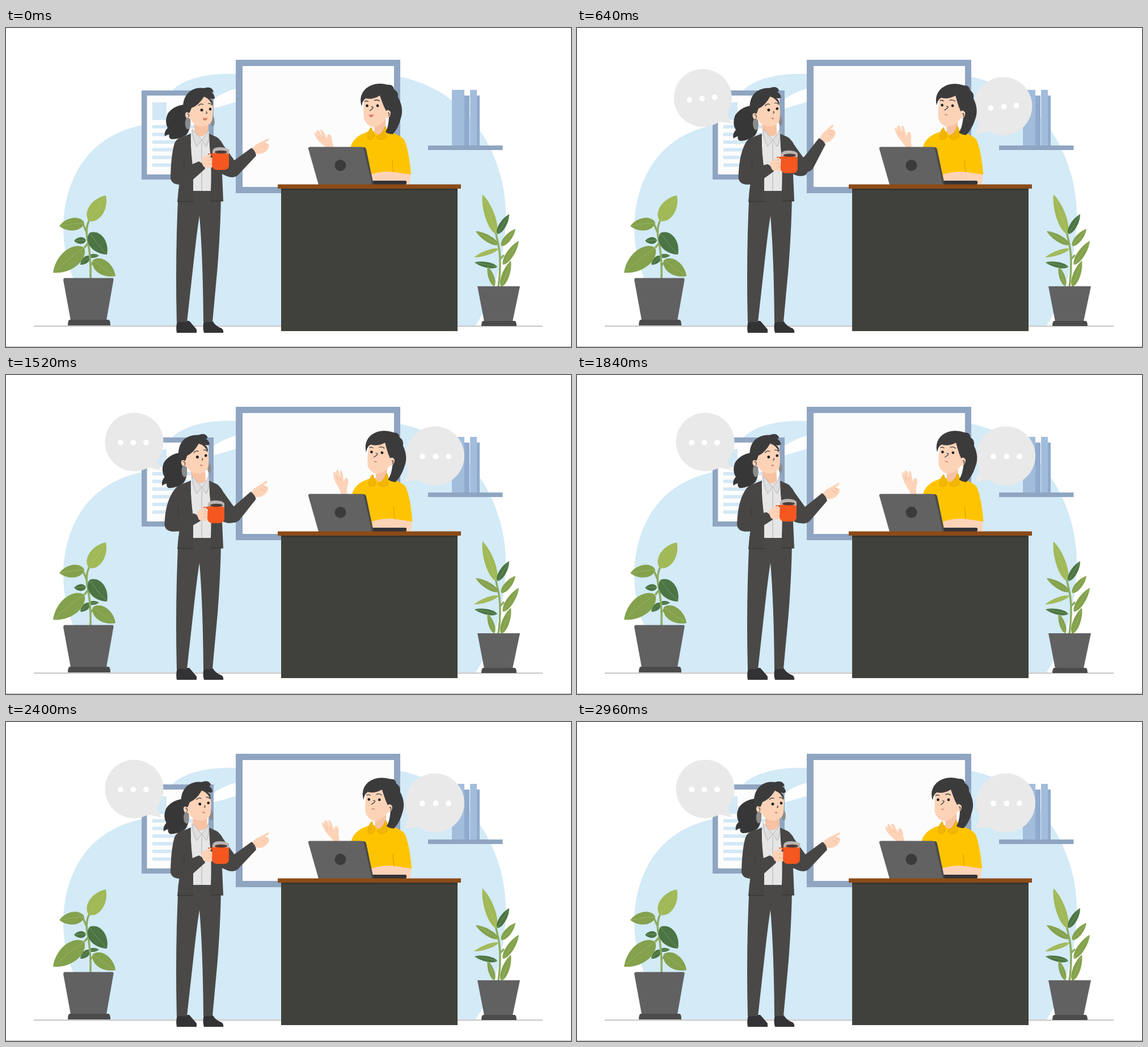
An HTML page for the animation above (3.04 s loop, 996 px wide and 562 px high).

```html
<!DOCTYPE html>
<html lang="en">
<head>
<meta charset="utf-8">
<title>Front desk chat</title>
<style>
html, body { margin: 0; width: 100%; height: 100%; overflow: hidden; background: #fff; }
svg { display: block; width: 100vw; height: 100vh; }
</style>
</head>
<body>
<svg id="stage" viewBox="0 0 996 562" preserveAspectRatio="none">
  <g id="room">
    <path fill="#d3eaf7" d="M101 350C102 285 130 194 240 171C305 158 355 146 405 130L500 80L690 85C735 94 770 111 800 140C852 186 881 260 881 330C881 400 860 475 828 524H172C150 500 130 470 118 440Q101 400 101 350Z"/>
    <path fill="#fff" d="M240 171Q320 153 405 130V70H240Z"/>
    <path fill="#d3eaf7" d="M291 112C312 88 360 79 405 81V107Q385 112 366 125L330 112Z"/>
    <path fill="#b3b3b3" d="M49 524.500H946V526H49Z"/>
    <path fill="#b5b5b5" d="M0 561H996V562H0Z"/>
    <path fill="#8fa5c1" d="M239 110H366V267H239Z"/>
    <path fill="#fdfdfd" d="M248.500 119H357V258H248.500Z"/>
    <path fill="#d3e8f6" d="M258 131H283V162H258Z"/>
    <path stroke="#d3e8f6" stroke-width="6" d="M258 174H347M258 187.500H347M258 201H347M258 214.500H347M258 228H347M258 241.500H347"/>
    <path fill="#8fa5c1" d="M405 56H695V291H405Z"/>
    <path fill="#fcfcfc" d="M417 67H684V280H417Z"/>
    <path fill="#a2bddc" d="M786 109H808V207H786ZM818 109H830V207H818Z"/>
    <path fill="#90aace" d="M808 119H817V207H808ZM830 119H835V207H830Z"/>
    <path fill="#8fa5c1" d="M744 207H875.500V215H744Z"/>
  </g>
  <g id="plants"></g>
  <g id="bubbleLeft" fill="#e9e9e9">
    <path d="M247 162L273 168L264 147Z"/><circle cx="226" cy="118" r="51.500"/>
    <g fill="#fff"><circle cx="202" cy="119" r="5"/><circle cx="224.500" cy="119" r="5"/><circle cx="247" cy="119" r="5"/></g>
  </g>
  <g id="bubbleRight" fill="#e9e9e9">
    <path d="M708 165Q709 178 701 187Q717 188 731 183Z"/><circle cx="756" cy="142.500" r="52"/>
    <g fill="#fff"><circle cx="734" cy="143.500" r="5"/><circle cx="757.500" cy="143.500" r="5"/><circle cx="780" cy="143.500" r="5"/></g>
  </g>

  <g id="clerk">
    <g id="wave" fill="#fdd3b8">
      <path d="M568 214Q560 207 553 201Q545 193 543.500 186Q544 182 547 186L551 191Q545 184 548 180Q551 178 555 187L558 190Q553 181 554 179Q558 178 562 187L566 195Q566 186 570 187Q575 190 575 201L579 214L600 245L585 250Z"/>
      <path d="M551 191L555 196M558 190L560 195" stroke="#efb89c" fill="none"/>
    </g>
    <g id="clerkBody">
      <path fill="#ffc400" d="M641 182Q625 186 617 194Q607 203 607 216L630 270H684L714 258Q710 214 702 197Q695 188 671 181Z"/>
      <path d="M684 257Q681 246 681 232" stroke="#dca500" stroke-width="1.300" fill="none"/>
      <path fill="#fdd3b8" d="M643 258Q665 251 685 254L713 258Q713 270 711 276H645Z"/>
      <path fill="#f7c2a2" d="M648 160H669V180Q660 193 650 185Z"/>
      <path fill="#f3b600" stroke="#dca500" stroke-width=".8" d="M644 175Q637 181 637 195Q646 200 650 190Q646 183 644 175ZM668 173Q673 178 671 193Q660 201 653 192Q665 185 668 173Z"/>
    </g>
    <g id="clerkHead">
      <path fill="#3c3b3c" d="M670 101Q682 97 684 108Q692 112 691 122Q702 141 696 159Q692 176 682 187Q673 187 669 183Q676 172 675 145Z"/>
      <path fill="#fdd3b8" d="M632 122Q629 145 631 160Q635 172 648 175Q664 171 670 159Q679 158 678 147L672 118L650 105Z"/>
      <path fill="#3c3b3c" d="M627 138Q621 120 634 107Q650 94 673 100Q688 106 686 130Q685 146 678 148Q674 142 670 146L666 138Q662 128 659 119Q646 127 634 124Q628 128 627 138Z"/>
      <path d="M673 150Q677 148 675 155M632 130Q635 127 639 130M649 128Q654 125 659 129M644 139Q649 138 646 142L641 146" fill="none" stroke="#3c3b3c" stroke-width="1.300"/>
      <circle cx="636.500" cy="137" r="2.400" fill="#222"/><circle cx="655" cy="137" r="2.400" fill="#222"/>
      <path class="mouth" fill="#d97965" d="M639 152Q644 154 649 152Q646 158 642 157Z"/>
      <path class="lips" fill="#d98a76" d="M641 153Q645 151.500 648 154Q645 156 641 153Z"/>
    </g>
  </g>

  <g id="desk">
    <path fill="#333337" d="M641 269H704Q708 270 705 276H641Z"/>
    <path fill="#4a4a4b" d="M625 210H630Q634 210 635 214L648 276H635Z"/>
    <path fill="#626263" d="M536 209.500H626Q630 210 631 214L645 276H551L533 213Q532 210 536 209.500Z"/>
    <circle cx="589.500" cy="242" r="10" fill="#3b3b3c"/>
    <path fill="#41413c" d="M485 282H796V534H485Z"/>
    <path fill="#363631" d="M485 283H796V286H485Z"/>
    <path fill="#8b4b17" d="M479 275.500H802V283H479Z"/>
  </g>

  <g id="visitor">
    <g id="visitorHead">
      <path fill="#383738" d="M314 135Q295 137 285 151Q279 165 285 176Q278 183 280 191Q285 187 288 188Q286 194 292 196Q306 196 317 189Q326 180 325 160L328 140Z"/>
      <ellipse cx="364.500" cy="165" rx="3.300" ry="9" fill="#8c8c8c"/>
      <path fill="#f7c2a2" d="M332 155H357V200H332Z"/>
      <path fill="#fdd3b8" d="M326 124L323 149Q315 146 316 154Q318 163 326 161Q331 173 347 174Q364 171 364 157Q367 138 361 122L345 113Z"/>
      <path fill="#3c3b3c" d="M312 147Q310 122 325 111Q336 104 349 106Q361 102 365 110Q365 115 361 113Q368 117 368 124Q364 126 359 124Q366 128 364 137Q360 125 349 121Q339 137 327 141Q325 147 323 150Q316 145 316 153Q313 152 312 147Z"/>
      <ellipse cx="320.500" cy="168" rx="4.800" ry="10.500" fill="#8c8c8c"/>
      <path d="M319 151Q324 151 322 157M339 137Q343 132 348 135M356 133Q361 132 363 136M353 147Q356 150 352 151" fill="none" stroke="#3c3b3c" stroke-width="1.200"/>
      <circle cx="345" cy="144.500" r="2.500" fill="#222"/><circle cx="360" cy="143" r="2.400" fill="#222"/>
      <path class="mouth" fill="#d97965" d="M347 158Q351 160 355 157.500Q354 164 350 163Q347 162 347 158Z"/>
      <path class="lips" fill="#d98a76" d="M348 159Q352 157 354 160Q351 163 348 159Z"/>
    </g>
    <path fill="#333335" d="M302 516H323Q331 525 336 531V537H301Q299 527 302 516ZM349 516H364Q370 526 380 529Q384 532 383 537H349Q346 528 349 516Z"/>
    <path fill="#4a4947" d="M304 284H379Q379 340 373 420L364 518H348Q347 400 341 331Q337 355 331 410L319 518H301Q298 400 304 284Z"/>
    <path fill="#e6e6e7" d="M326 180L334 184Q344 200 357 180L362 200V287H329Z"/>
    <path fill="none" stroke="#b8b8ba" stroke-width="1.200" d="M345 202V287"/>
    <path fill="#dededf" stroke="#b4b4b6" d="M328 178L333 183L345 198L336 209Q329 196 328 178ZM357 178L354 186L345 198L353 209Q360 197 357 178Z"/>
    <path fill="#474645" d="M326 186L303 195Q294 203 299 230L307 260L302 306H329L330 287V250Q325 215 326 186ZM358 186L374 194Q381 202 380 235L383 305H361V287Q363 240 359 210Z"/>
    <path fill="#383838" d="M302 305H331V306.500H302ZM361 304H383V305.500H361Z"/>
    <path fill="#474645" d="M364 189Q377 193 383 206L406 238Q411 250 403 259Q388 265 374 252Z"/>
    <g id="pointArm">
      <path fill="#fdd3b8" d="M432 215Q437 207 443 204L462 194.500Q465 195 463 198L456 202Q464 203 464 208Q463 214 456 219Q447 224 441 221L437 226Z"/>
      <path d="M455 203Q459 205 460 208M450 208Q456 209 458 213" stroke="#eeb799" fill="none"/>
      <path fill="#474645" d="M385 249Q389 238 400 235L433 211Q440 217 441 225L409 259Q401 266 389 261Q381 257 385 249Z"/>
    </g>
    <path id="upperArm" fill="none" stroke="#474645" stroke-width="25" stroke-linecap="round"/>
    <path id="foreArm" fill="#474645"/>
    <path id="armFold" fill="none" stroke="#373737"/>
    <g id="mug">
      <path d="M367 223H358Q356 238 367 239" fill="none" stroke="#dd4515" stroke-width="3.500"/>
      <path fill="#fdd3b8" d="M344 234Q346 227 354 224L360 222Q364 224 358 227L364 229V245Q357 248 348 244Z"/>
      <path d="M355 233H364M355 239H364" stroke="#efb89c"/>
      <path fill="#f4571f" d="M364 216L393 214V243Q392 250 384 250H371Q364 249 363 242Z"/>
      <path fill="#bab5b3" d="M364 218Q364 210 377 210Q391 210 393 216V222Q379 218 364 221Z"/>
      <ellipse cx="379" cy="218.500" rx="11" ry="2.800" fill="#4b3d3a"/>
    </g>
  </g>
</svg>
<script>
const $ = id => document.getElementById(id);
const LOOP = 3040, STEP = 80;
const LIGHT = '#a1b957', MID = '#84a24d', DARK = '#4b7544';

function leaf(x1, y1, x2, y2, width, color) {
  const dx = x2 - x1, dy = y2 - y1, len = Math.hypot(dx, dy);
  const nx = -dy / len * width, ny = dx / len * width;
  const at = (k, side) => `${x1 + dx * k + nx * side} ${y1 + dy * k + ny * side}`;
  return `<path fill="${color}" d="M${x1} ${y1}C${at(.12, .67)} ${at(.68, .67)} ${x2} ${y2}C${at(.68, -.67)} ${at(.12, -.67)} ${x1} ${y1}Z"/>
    <path fill="none" stroke="#c3cf8e" stroke-width=".7" opacity=".5" d="M${x1} ${y1}Q${at(.5, .08)} ${at(.93, 0)}"/>`;
}
const stem = d => `<path d="${d}" fill="none" stroke="#8dac63" stroke-width="3.500"/>`;
const pot = (body, base) => `<path fill="#616162" d="${body}"/><path fill="#4b4b4c" d="${base}"/>`;

$('plants').innerHTML = [
  leaf(141, 374, 120, 375, 12, DARK), leaf(148, 402, 131, 417, 11, DARK), leaf(146, 402, 164, 401, 7, DARK),
  stem('M149 441Q150 405 144 374Q139 352 148 336M144 380L138 387M149 418L157 410M142 360L136 346'),
  leaf(146, 340, 176, 295, 27, LIGHT), leaf(138, 343, 94, 349, 22, MID),
  leaf(147, 361, 178, 399, 28, DARK), leaf(138, 387, 83, 431, 33, MID), leaf(153, 409, 193, 437, 25, MID),
  pot('M103 440.500H188Q190 441 189.500 444L177 515H114L101 444Q101 441 103 440.500Z', 'M112 514H181Q184 515 184 524H109Q109 515 112 514Z'),
  stem('M868 456Q874 410 868 382L861 350M870 408L878 400'),
  leaf(864, 363, 840, 293, 17, LIGHT), leaf(866, 363, 887, 328, 12, DARK),
  leaf(873, 384, 898, 354, 12, MID), leaf(868, 382, 828, 358, 12, MID),
  leaf(868, 389, 825, 404, 8, LIGHT), leaf(876, 417, 904, 375, 13, MID),
  leaf(866, 421, 826, 413, 10, DARK), leaf(861, 455, 849, 420, 10, MID), leaf(873, 456, 890, 410, 13, MID),
  pot('M831 455H906L893 517H843Z', 'M841 516H897Q900 517 900 525H838Q838 517 841 516Z')
].join('');

// Smooth curve through [time, value] keys.
function curve(t, keys) {
  let i = 0;
  while (i < keys.length - 2 && t > keys[i + 1][0]) i++;
  const slope = j => {
    if (j < 1 || j > keys.length - 2) return 0;
    const [[ta, a], [, b], [tc, c]] = keys.slice(j - 1, j + 2);
    return (b - a) * (c - b) <= 0 ? 0 : (c - a) / (tc - ta);
  };
  const [t0, v0] = keys[i], [t1, v1] = keys[i + 1], span = t1 - t0;
  const u = Math.min(1, Math.max(0, (t - t0) / span)), w = 1 - u;
  return v0 * w * w * (1 + 2 * u) + v1 * u * u * (3 - 2 * u)
    + span * u * w * (slope(i) * w - slope(i + 1) * u);
}
const set = (id, name, value) => $(id).setAttribute(name, value);
const move = (id, value) => set(id, 'transform', value);

function draw(t) {
  const tilt = curve(t, [[0, 0], [400, .68], [1040, 1], [1520, .94], [1840, .88], [2400, .4], [2960, 0]]);
  const lean = curve(t, [[0, 0], [400, .68], [900, 1], [1840, 1], [2400, .42], [2960, 0]]);
  const sip = curve(t, [[0, 0], [400, .36], [1040, .75], [1520, 1], [1840, .75], [2400, 0], [2960, 0]]);
  const point = curve(t, [[0, 0], [400, -17], [1040, -11], [1520, -5], [1840, -2.6], [2400, 0]]);
  const wave = curve(t, [[0, 0], [400, 7.5], [1040, 16], [1520, 21], [1840, 18.5], [2400, 9], [2960, 0]]);
  const pop = curve(t, [[0, 0], [400, .8], [720, 1]]);
  const spin = curve(t, [[0, -14], [400, -8], [1040, -2.5], [1520, 0]]);

  move('visitorHead', `translate(${-4.6 * tilt}) rotate(${-4 * tilt} 343 195)`);
  move('clerkHead', `translate(${5 * lean}) rotate(${4 * lean} 657 178)`);
  move('clerkBody', `translate(${2.5 * lean})`);
  move('wave', `rotate(${wave} 600 270)`);
  move('pointArm', `rotate(${point} 368 226)`);
  move('mug', `translate(${-8 * sip} ${11 * sip})`);

  const ex = 302.5 - 10.5 * sip, wx = 347 - 8 * sip, wy = 243 + 9 * sip;
  set('upperArm', 'd', `M309 207Q${ex + 1} 225 ${ex} 263`);
  set('foreArm', 'd', `M${ex} 251L${wx - 7} ${wy - 8}Q${wx + 3} ${wy - 3} ${wx + 4} ${wy + 5}L${ex + 25} ${269 + sip * 3}Q${ex + 12} 277 ${ex} 275.500Z`);
  set('armFold', 'd', `M${ex + 12} 248L${ex + 11} 233`);

  const bubble = (id, x, y) => move(id, `translate(${x} ${y}) rotate(${spin}) scale(${pop}) translate(${-x} ${-y})`);
  bubble('bubbleLeft', 272, 168);
  bubble('bubbleRight', 701, 187);

  const talking = t < 240 || (t >= 880 && t < 1200);
  document.querySelectorAll('.mouth').forEach(m => m.style.display = talking ? '' : 'none');
  document.querySelectorAll('.lips').forEach(m => m.style.display = talking ? 'none' : '');
}

const start = performance.now();
function tick() {
  const t = Math.max(0, performance.now() - start) % LOOP;
  draw(Math.floor(t / STEP) * STEP);
  requestAnimationFrame(tick);
}
tick();
</script>
</body>
</html>
```
